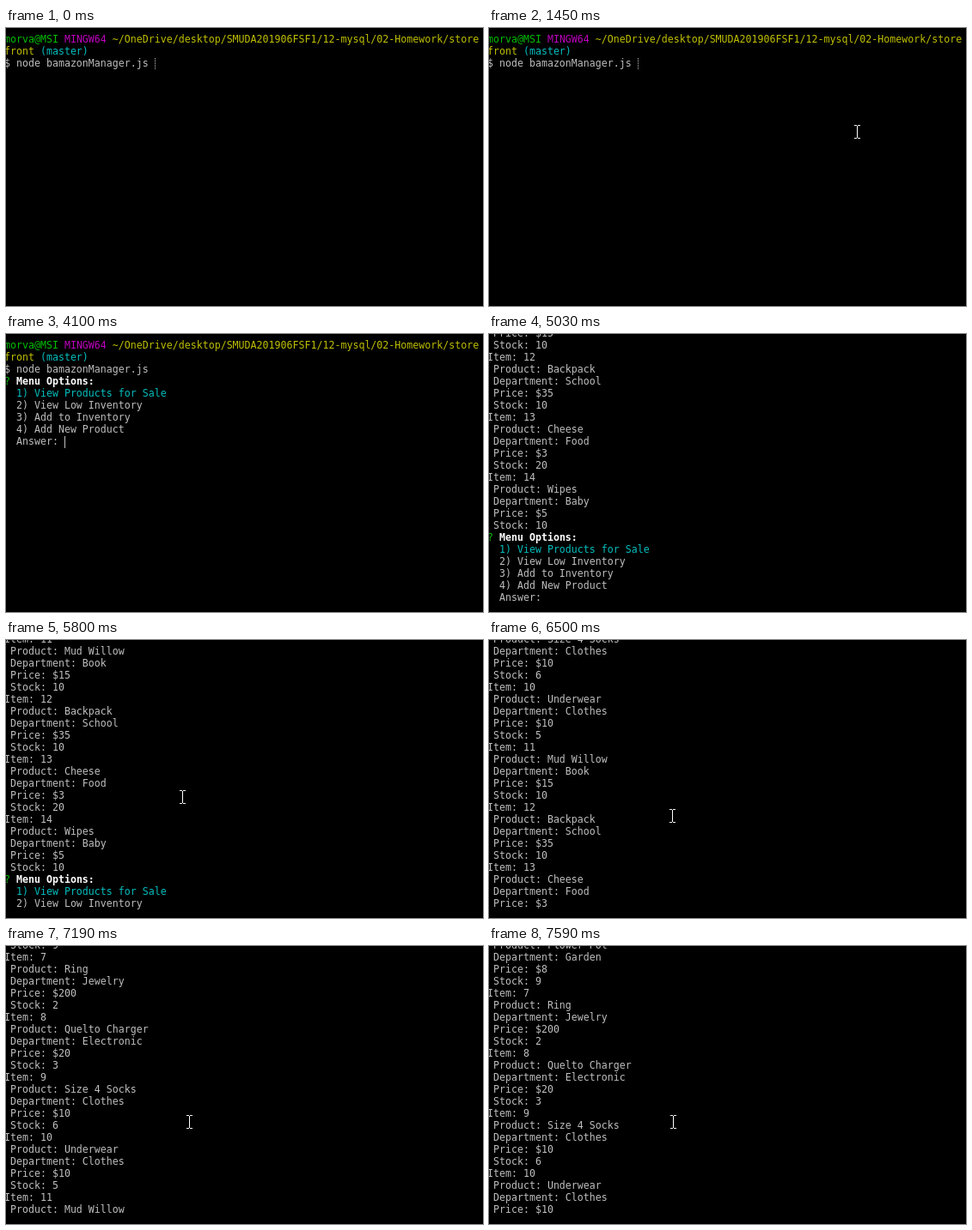
An HTML page for the animation above (8000 ms loop, 555 by 324 pixels).

```html
<!DOCTYPE html>
<html lang="en">
<head>
<meta charset="utf-8">
<title>Store manager terminal</title>
<style>
  html, body { margin: 0; width: 100%; height: 100%; overflow: hidden; background: #000; }
  svg { display: block; }
  text { font: 11.627px "DejaVu Sans Mono", monospace; white-space: pre; fill: #bfbfbf; }
  .green { fill: #00bf00; }
  .magenta { fill: #bf00bf; }
  .yellow { fill: #bfbf00; }
  .cyan { fill: #00bfbf; }
  .bold { fill: #fff; font-weight: bold; }
</style>
</head>
<body>
<svg width="555" height="324" viewBox="0 0 555 324">
  <clipPath id="screen"><rect width="555" height="315"/></clipPath>
  <g id="prompt"></g>
  <g id="menu"></g>
  <g clip-path="url(#screen)"><g id="list"></g></g>
  <path id="caret" d="M.5 0v14" stroke="#bfbfbf"/>
  <circle id="click" cx="426" cy="120" r="15" fill="#ff0" fill-opacity=".47"/>
  <path id="pointer" d="M0 .5h3m1 0h3M3.5 1v14M0 15.5h3m1 0h3" fill="none" stroke="#fff"/>
</svg>
<script>
const LOOP = 8000, COL = 7, ROW = 14, LEFT = -2, TOP = 7;
const $ = id => document.getElementById(id);
const SVG = "http://www.w3.org/2000/svg";

// A line is a list of [text, class] runs.
function addLines(group, firstRow, lines) {
  lines.forEach((runs, i) => {
    const line = document.createElementNS(SVG, "text");
    line.setAttribute("x", LEFT);
    line.setAttribute("y", TOP + (firstRow + i) * ROW + 10);
    for (const [str, cls] of runs) {
      const span = document.createElementNS(SVG, "tspan");
      span.textContent = str;
      if (cls) span.setAttribute("class", cls);
      line.append(span);
    }
    group.append(line);
  });
}

const prompt = [
  [["morva@MSI ", "green"], ["MINGW64 ", "magenta"],
   ["~/OneDrive/desktop/SMUDA201906FSF1/12-mysql/02-Homework/store", "yellow"]],
  [["front ", "yellow"], ["(master)", "cyan"]],
  [["$ node bamazonManager.js"]]
];

const menu = [
  [["? ", "green"], ["Menu Options:", "bold"]],
  [["  1) View Products for Sale", "cyan"]],
  [["  2) View Low Inventory"]],
  [["  3) Add to Inventory"]],
  [["  4) Add New Product"]],
  [["  Answer: "]]
];

const FIRST_ITEM = 6;
const stock = [
  ["Flower Pot", "Garden", 8, 9],
  ["Ring", "Jewelry", 200, 2],
  ["Quelto Charger", "Electronic", 20, 3],
  ["Size 4 Socks", "Clothes", 10, 6],
  ["Underwear", "Clothes", 10, 5],
  ["Mud Willow", "Book", 15, 10],
  ["Backpack", "School", 35, 10],
  ["Cheese", "Food", 3, 20],
  ["Wipes", "Baby", 5, 10]
].flatMap(([name, dept, price, count], i) => [
  `Item: ${FIRST_ITEM + i}`, ` Product: ${name}`, ` Department: ${dept}`,
  ` Price: $${price}`, ` Stock: ${count}`
].map(str => [[str]]));

addLines($("prompt"), 0, prompt);
addLines($("menu"), 3, menu);
const listing = [...stock, ...menu];
addLines($("list"), 22 - listing.length, listing);

// Timelines: [start, ...state], each held until the next start.
const pointerSteps = [
  [0], [70, 364, 140], [140, 337, 120], [1450, 425, 113], [2380],
  [5410, 476, 136], [5490, 428, 144], [5570, 352, 155], [5640, 280, 165],
  [5720, 225, 172], [5800, 202, 175], [5880, 206, 186], [5950, 210, 197],
  [7420, 211, 197]
];
const caretSteps = [
  [0, 25, 2], [2150], [3090, 10, 8], [3550], [4100, 10, 8],
  [4570, 10, 21], [5030], [5490, 10, 21], [5800]
];
const scrollTimes = [5800, 5880, 5950, 6500, 6650, 6890, 6960, 7190, 7590];
const LINES_PER_NOTCH = 3;

const stateAt = (steps, t) => steps.findLast(s => s[0] <= t).slice(1);
const show = (id, on) => $(id).setAttribute("visibility", on ? "visible" : "hidden");

function place(id, x, y) {
  show(id, x !== undefined);
  if (x !== undefined) $(id).setAttribute("transform", `translate(${x} ${y})`);
}

function draw(t) {
  const listed = t >= 4570;
  show("prompt", !listed);
  show("menu", t >= 3090 && !listed);
  show("list", listed);
  const notches = scrollTimes.filter(s => s <= t).length;
  $("list").setAttribute("transform", `translate(0 ${notches * LINES_PER_NOTCH * ROW})`);

  const [col, row] = stateAt(caretSteps, t);
  place("caret", col && LEFT + col * COL, TOP + row * ROW);
  $("caret").setAttribute("stroke-dasharray", t < 1620 ? "1 1" : "none");

  show("click", t >= 1620 && t < 1770);
  place("pointer", ...stateAt(pointerSteps, t));
}

const start = performance.now();
function tick() {
  draw((performance.now() - start) % LOOP);
  requestAnimationFrame(tick);
}
tick();
</script>
</body>
</html>
```
